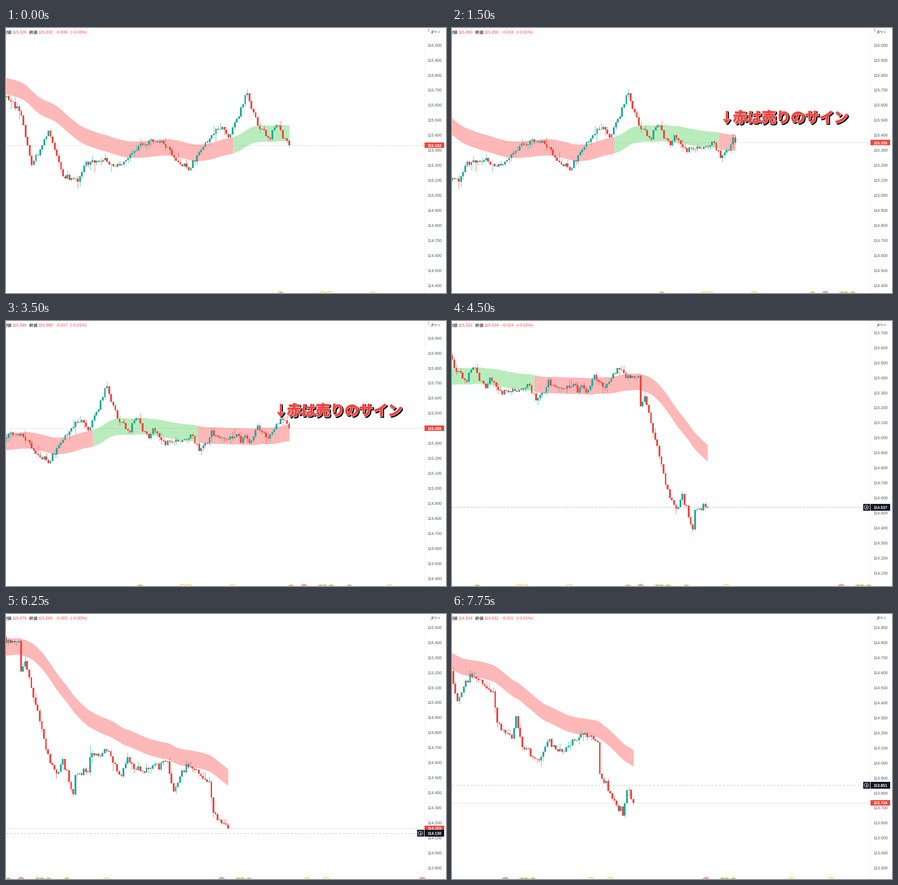
Animation of 963 by 581 pixels, one loop 8000 ms. Source, as a matplotlib script:

```python
import numpy as np
import matplotlib.pyplot as plt
from matplotlib import patheffects as pe
from matplotlib.animation import FuncAnimation
from matplotlib.collections import LineCollection, PolyCollection
from matplotlib.patches import Circle, FancyBboxPatch, PathPatch, Rectangle
from matplotlib.path import Path

plt.rcParams["text.hinting"] = "none"

W, H, DPI = 963, 581, 64
PT = 72 / DPI                      # points per pixel
STEP, X0, COUNT = 4.58, 1.4, 367   # candle pitch, first candle, candles
SCALE, Y116 = 329.3, 37.3          # pixels per yen, height of 116.000
UP, DOWN, INK = "#22aa99", "#f24440", "#131722"
PINK, MINT = "#feb8b7", "#b9ecbc"

# Main swings of the close: (candle, height)
SWINGS = [
    (0, 149), (3, 162), (7, 192), (12, 300), (20, 225), (27, 325), (34, 337), (38, 293),
    (46, 290), (52, 304), (59, 277), (65, 256), (74, 247), (80, 284), (87, 312),
    (95, 250), (103, 217), (106, 240), (115, 143), (120, 214), (125, 240), (129, 213),
    (137, 235), (143, 272), (156, 252), (159, 285), (163, 268), (165, 240), (184, 262),
    (187, 229), (192, 257), (198, 214), (208, 231), (209, 298), (211, 276), (223, 499),
    (226, 523), (229, 490), (234, 568), (235, 525), (242, 486), (251, 473), (257, 528),
    (260, 486), (264, 514), (279, 495), (282, 561), (288, 501), (299, 540), (301, 608),
    (310, 594), (313, 662), (321, 691), (325, 650), (332, 672), (343, 631), (349, 651),
    (350, 720), (361, 812), (363, 756)]

# step, newest candle, scroll x, scroll y, price, header: low, close, change
KEYS = np.array([
    (0, 135, 0, 0, 115.332, 115.326, 115.332, -.036),
    (5, 166, 142, 0, 115.350, 115.350, 115.350, -.016),
    (10, 166, 142, 0, 115.350, 115.350, 115.350, -.016),
    (14, 202, 307, 0, 115.399, 115.399, 115.399, -.017),
    (18, 241, 546, 110.6, 114.537, 115.322, 115.324, -.024),
    (21, 270, 749, 161.5, 114.558, 115.355, 115.387, .005),
    (25, 308, 926, 172.5, 114.163, 115.276, 115.292, -.001),
    (31, 366, 1281, 369.6, 113.734, 114.518, 114.532, -.011)])
CURSOR = [(17, 114.600), (18, 114.537), (21, 114.121), (25, 114.130), (31, 113.851)]
GREEN = 497, 726                   # rising stretch of the band
BAND_START, BAND_HALF = 127.5, 18
DAY = 439                          # pixels per day


def height(price):
    return Y116 + (116 - price) * SCALE


def price_at(y):
    return 116 - (y - Y116) / SCALE


def build_candles():
    """Jitter around the swings; each candle opens at the previous close."""
    rng = np.random.default_rng(12)
    stops = {int(row[1]): height(row[4]) for row in KEYS}
    knots = np.array(sorted({**dict(SWINGS), **stops}.items()))
    k = np.arange(COUNT)
    close = np.interp(k, *knots.T) + rng.normal(0, 4, COUNT) * ~np.isin(k, knots[:, 0])
    start = np.r_[151, close[:-1]]
    high = np.minimum(start, close) - rng.exponential(3.5, COUNT)
    low = np.maximum(start, close) + rng.exponential(3.5, COUNT)
    return X0 + STEP * k, start, close, high, low


def ema(values, span, first):
    out = [first]
    for v in values[1:]:
        out.append(out[-1] + (v - out[-1]) * 2 / (span + 1))
    return np.array(out)


CX, OPEN, CLOSE, HIGH, LOW = build_candles()
BX = np.arange(0, CX[-1] + 1)
BAND = np.interp(BX, CX, ema(CLOSE, 60, BAND_START))

fig = plt.figure(figsize=(W / DPI, H / DPI), dpi=DPI, facecolor="white")
ax = fig.add_axes([0, 0, 1, 1])


def label(x, y, s, size=8.9, color="#50535e", font="Liberation Sans", **kw):
    kw = {"va": "center_baseline", "zorder": 6, **kw}
    return ax.text(x, y, s, fontsize=size * PT, color=color, family=font, **kw)


def tag(y, h, color, price, z):
    ax.add_patch(Rectangle((916, y - h / 2), 42.5, h, fc=color, ec="none", zorder=z))
    label(937.5, y, f"{price:.3f}", 8.6, "white", ha="center", weight="bold", zorder=z + 1)


def draw_band(last, dx, dy):
    for a, b, color in ((0, GREEN[0], PINK), (*GREEN, MINT), (GREEN[1], BX[-1], PINK)):
        m = (BX >= a) & (BX <= min(b, CX[last] + .5))
        if m.any():
            ax.fill_between(BX[m] - dx, BAND[m] - BAND_HALF - dy, BAND[m] + BAND_HALF - dy,
                            color=color, lw=0, zorder=1)


def draw_candles(last, dx, dy):
    n = np.arange(last + 1)
    n = n[CX[n] > dx - 5]
    x = CX[n] - dx
    colors = np.where(CLOSE[n] < OPEN[n], UP, DOWN)
    wicks = np.stack([np.c_[x, HIGH[n] - dy], np.c_[x, LOW[n] - dy]], axis=1)
    ax.add_collection(LineCollection(wicks, colors=colors, lw=.8 * PT, zorder=3))
    mid = (OPEN[n] + CLOSE[n]) / 2 - dy
    half = np.maximum(abs(OPEN[n] - CLOSE[n]) / 2, .7)
    l, r, t, b = x - 1.9, x + 1.9, mid - half, mid + half
    bodies = np.stack([np.c_[l, t], np.c_[r, t], np.c_[r, b], np.c_[l, b]], axis=1)
    ax.add_collection(PolyCollection(bodies, facecolors=colors, lw=0, zorder=4))


def draw_axis(dy):
    ax.plot([916, 916], [0, H], color="#f0f1f4", lw=PT, zorder=1)
    first = int(np.floor(price_at(dy - 6) * 10))
    for tenth in range(first, first - 19, -1):
        label(938.5, height(tenth / 10) - dy, f"{tenth / 10:.3f}", ha="center")
    ax.add_patch(FancyBboxPatch((928, 4), 23, 10, boxstyle="round,pad=2", fc="white",
                                ec="#f1f2f5", lw=.6, zorder=7))
    label(929, 9, "JPY", 8.6, zorder=8)
    ax.fill([945.5, 949.5, 947.5], [8, 8, 10.3], color="#50535e", lw=0, zorder=8)


def draw_price(last, dy):
    y = CLOSE[last] - dy
    ax.plot([0, 916], [y, y], color="#c09a9a", lw=.8 * PT, ls=(0, (1, 1.6)), zorder=2)
    tag(y, 12, DOWN, price_at(CLOSE[last]), 9)


def draw_cursor(i, dy):
    price = np.interp(i, *zip(*CURSOR))
    y = height(price) - dy
    ax.plot([0, 900], [y, y], color="#a3a6ad", lw=.8 * PT, ls=(0, (5, 5)), zorder=2)
    ax.add_patch(Rectangle((900, y - 7.5), 14.5, 15, fc=INK, ec="none", zorder=11))
    ax.add_patch(Circle((907, y), 4.6, fc="none", ec="white", lw=.9 * PT, zorder=12))
    for h, v in ((2.3, 0), (0, 2.3)):
        ax.plot([907 - h, 907 + h], [y - v, y + v], color="white", lw=.9 * PT, zorder=12)
    tag(y, 15, INK, price, 11)


def draw_header(low, close, change):
    color = DOWN if change < 0 else UP
    for x, s in ((-5.5, "安値"), (51, "終値")):
        label(x, 9, s, 9, font="Noto Sans CJK JP")
    pct = f"({change / close * 100:+.2f}%)"
    for x, s in ((13, f"{low:.3f}"), (70, f"{close:.3f}"), (108, f"{change:+.3f}"), (140, pct)):
        label(x, 9, s.replace("-", "−"), 9, color)


def badge(x, ring, core=None):
    if -8 < x < 916:
        ax.add_patch(Circle((x, 584), 6.6, fc="white", ec=ring, lw=1.3 * PT, zorder=3))
        if core:
            ax.add_patch(Circle((x, 584), 4.7, fc=core, lw=0, zorder=3))


def draw_badges(dx):
    gold, teal = "#f3c833", "#4f9fb4"
    for x in (693, 803, 1627, 2111):
        badge(x - dx, gold)
    for x in (601, 931, 1059):
        badge(x - dx, gold, teal)
    for day in range(4):
        x = 959 + DAY * day - dx
        badge(x - 252, gold)
        badge(x, "#ee5552", "#8d8fa0")
        for gap in (36, 45, 60):
            badge(x + gap, gold, teal)


def draw_caption():
    arrow = np.array([(601, 183), (601, 206), (595.5, 200.5), (601, 207.5), (606.5, 200.5)])
    codes = [Path.MOVETO, Path.LINETO, Path.MOVETO, Path.LINETO, Path.LINETO]
    layers = (("black", 3.4, 2.2), ("white", 2.8, 0), (DOWN, 1.2, 0))
    for z, (color, width, shift) in enumerate(layers, 20):
        label(615 + shift, 207 + shift, "赤は売りのサイン", 31.5, color, "Noto Sans CJK JP",
              va="baseline", weight="bold", zorder=z,
              path_effects=[pe.Stroke(linewidth=width * PT, foreground=color,
                                      joinstyle="round")])
        ax.add_patch(PathPatch(Path(arrow + shift, codes), fc="none", ec=color,
                               lw=(width + 2.4) * PT, capstyle="round",
                               joinstyle="round", zorder=z))


def draw(i):
    ax.clear()
    ax.set(xlim=(0, W), ylim=(H, 0))
    ax.axis("off")
    last, dx, dy, _, *header = (np.interp(i, KEYS[:, 0], col) for col in KEYS.T[1:])
    last = int(round(last))
    draw_band(last, dx, dy)
    draw_candles(last, dx, dy)
    draw_badges(dx)
    draw_axis(dy)
    draw_price(last, dy)
    draw_header(*header)
    if i >= 17:
        draw_cursor(i, dy)
    if 6 <= i <= 15:
        draw_caption()
    return []


anim = FuncAnimation(fig, draw, frames=32, interval=250, init_func=lambda: [],
                     repeat=True, repeat_delay=0)
plt.show()
```
